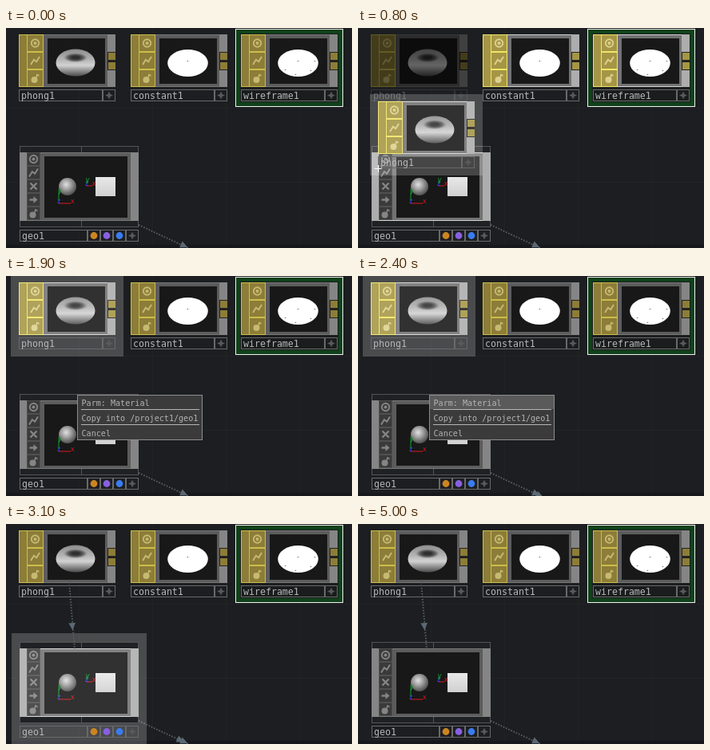
These frames come from a looping animation (433 px wide and 276 px high, 5.2 s). An HTML page:

```html
<!DOCTYPE html>
<html lang="en">
<head>
<meta charset="utf-8">
<title>Node network</title>
<style>
  html, body { margin: 0; width: 100%; height: 100%; overflow: hidden; background: #1c1e21; }
  svg {
    display: block; width: 433px; height: 276px;
    --yellow: #8c7d38; --edge: #cdbd4c; --icon: #c6b970;
    --frame: #5c5c5c; --rim: #777; --strip: #858585;
  }
  .bright {
    --yellow: #a59646; --edge: #f0e566; --icon: #ddd08c;
    --frame: #727272; --rim: #d4d4d4; --strip: #adadad;
  }
  text { font: 11.6px "DejaVu Sans Mono", monospace; fill: #b8b8b8; }
  #menu text { font-size: 10.1px; fill: #b4b4b4; }
  .axis text { font: 9px "Liberation Sans", Arial, sans-serif; }
  .wire { stroke: #56616a; stroke-width: 2; stroke-dasharray: 1.5 2; fill: none; }
</style>
</head>
<body>
<svg id="stage" viewBox="0 0 433 276" xmlns="http://www.w3.org/2000/svg"></svg>
<script>
const LOOP = 5200;
const YELLOW = 'var(--yellow)', EDGE = 'var(--edge)', ICON = 'var(--icon)';
const FRAME = 'var(--frame)', RIM = 'var(--rim)', STRIP = 'var(--strip)';

const rect = (x, y, w, h, fill, stroke) => stroke
  ? `<rect x="${x + .5}" y="${y + .5}" width="${w - 1}" height="${h - 1}" style="fill:${fill};stroke:${stroke}"/>`
  : `<rect x="${x}" y="${y}" width="${w}" height="${h}" style="fill:${fill}"/>`;
const line = (x1, y1, x2, y2, color) => `<path d="M${x1} ${y1}L${x2} ${y2}" stroke="${color}" fill="none"/>`;
const label = (x, y, text, color) => `<text x="${x}" y="${y}" ${color ? `style="fill:${color}"` : ''}>${text}</text>`;
const ellipse = (x, y, rx, ry, fill) => `<ellipse cx="${x}" cy="${y}" rx="${rx}" ry="${ry}" fill="${fill}"/>`;
const group = (x, y, body, extra = '') => `<g transform="translate(${x} ${y})" ${extra}>${body}</g>`;

// Icons are centred on 0,0.
const icons = {
  ring: c => `<circle r="4.7" style="fill:none;stroke:${c};stroke-width:1.9"/><circle r="2" style="fill:${c}"/>`,
  bolt: c => `<path d="M5.5-5L1.6 1.2L-1.6-1.2L-5.5 5" style="fill:none;stroke:${c};stroke-width:2"/>`,
  lock: c => `<circle cx="-1" cy="2" r="4" style="fill:${c}"/>
    <path d="M1.5-1L2.5-4.5L5-3" style="fill:none;stroke:${c};stroke-width:1.6"/>`,
  cross: c => `<path d="M-4-4L4 4M4-4L-4 4" style="stroke:${c};stroke-width:2.4"/>`,
  arrow: c => `<path d="M-5-1.3H0V-4.5L5 0L0 4.5V1.3H-5Z" style="fill:${c}"/>`,
  plus: c => `<path d="M0-5L1.5-1.5L5 0L1.5 1.5L0 5L-1.5 1.5L-5 0L-1.5-1.5Z" style="fill:${c}"/>`
};

const torus = ellipse(71, 35.5, 24.5, 17, 'url(#metal)') + ellipse(71, 29, 16, 6.5, 'url(#hole)');
const blob = ellipse(71.5, 36, 25.3, 17, '#fff') + rect(71, 33, 1, 1, '#444');
const mesh = blob + [[55, 44], [68, 50], [87, 45], [92, 33]].map(([x, y]) => rect(x, y, 1, 1, '#444')).join('');

const plusBox = (x, y) => rect(x, y, 16, 15, 'none', '#696969') + group(x + 8, y + 7.5, icons.plus('#5a5a5a'));

// Material node, 121 by 84, placed at its top left corner.
function materialNode(name, shape) {
  const buttons = ['ring', 'bolt', 'lock'].map((icon, i) =>
    rect(10, i * 22, 21, 22, YELLOW, EDGE) + group(20.5, i * 22 + 11, icons[icon](ICON))).join('');
  return rect(0, 0, 121, 66, FRAME, RIM) +
    rect(0, 0, 11, 66, YELLOW, EDGE) + buttons +
    rect(36, 5, 72, 57, '#181818') + shape +
    rect(111, 0, 10, 66, STRIP) +
    rect(111, 22, 10, 23, '#222') +
    rect(112, 23, 9, 9, YELLOW) + rect(112, 35, 9, 9, YELLOW) +
    rect(0, 69, 105, 15, 'none', '#696969') + plusBox(105, 69) +
    label(3, 80.5, name);
}

// A node under the pointer: a pale plate behind it and a light film on it.
const litNode = (x, y, name, shape) =>
  rect(x - 10, y - 9, 141, 102, 'rgba(255,255,255,.2)') +
  group(x, y, materialNode(name, shape) + rect(0, 0, 121, 66, 'rgba(255,255,255,.11)'), 'class="bright"');

const axes = (x, y, size) => `<g class="axis">` +
  line(x, y, x + size, y, '#e01414') +
  line(x, y - 3, x, y - size, '#12a02a') +
  label(x - 2, y, 'z', '#3346ff') +
  label(x + size, y, 'x', '#e01414') +
  label(x - 1, y - size + 2, 'y', '#12a02a') + '</g>';

function geoNode() {
  const tabs = y => rect(17, y, 78, 9, '#202124', '#545454') + rect(94, y, 72, 9, '#202124', '#545454');
  const buttons = ['ring', 'bolt', 'cross', 'arrow', 'lock'].map((icon, i) =>
    rect(26, 156 + i * 17, 17, 17, '#3a3a3a', '#505050') +
    group(34.5, 164.5 + i * 17, icons[icon]('#858585'))).join('');
  const dots = ['#cc8420', '#8660e0', '#3a7cf0'].map((color, i) =>
    rect(102 + i * 16, 253, 16, 15, 'none', '#696969') +
    ellipse(110 + i * 16, 260.5, 4.4, 4.4, color)).join('');
  return tabs(148) + tabs(241) +
    rect(17, 156, 149, 86, FRAME, RIM) +
    rect(17, 156, 9, 86, STRIP) + buttons +
    rect(48, 161, 104, 77, '#181818') +
    ellipse(77, 199, 11, 11, 'url(#ball)') +
    axes(66, 220, 15) + axes(101, 198, 7) +
    rect(112, 187, 25, 24, 'url(#cube)') +
    rect(156, 156, 10, 86, STRIP) +
    rect(17, 253, 85, 15, 'none', '#696969') + label(20, 264.5, 'geo1') + dots +
    plusBox(150, 253);
}

const gridLines =
  [100, 193].map(y => line(0, y + .5, 433, y + .5, '#212327')).join('') +
  [91, 183, 275, 367].map(x => line(x + .5, 0, x + .5, 272, '#202226')).join('');

const head = (id, x, y, angle) =>
  `<path id="${id}" d="M5.5 0L-4-4.3V4.3Z" fill="#5b6973" transform="translate(${x} ${y}) rotate(${angle})"/>`;

const menu = rect(89, 149, 157, 57, '#3b3b3b', '#8d8d8d') +
  `<rect id="hover" x="90" y="150" width="155" height="17" fill="#5a5a5a"/>` +
  line(94, 167.5, 242, 167.5, '#b5b5b5') + line(94, 186.5, 242, 186.5, '#b5b5b5') +
  ['Parm: Material', 'Copy into /project1/geo1', 'Cancel']
    .map((text, i) => label(94.5, 163 + i * 19, text)).join('');

document.getElementById('stage').innerHTML = `
  <defs>
    <linearGradient id="metal" x2="0" y2="1">
      <stop stop-color="#8c8c8c"/><stop offset=".35" stop-color="#b0b0b0"/>
      <stop offset=".6" stop-color="#d2d2d2"/><stop offset="1" stop-color="#4a4a4a"/>
    </linearGradient>
    <radialGradient id="hole">
      <stop offset=".3" stop-color="#303030"/><stop offset=".65" stop-color="#686868"/>
      <stop offset="1" stop-color="#a0a0a0" stop-opacity="0"/>
    </radialGradient>
    <radialGradient id="ball" cx=".42" cy=".38" r=".62">
      <stop stop-color="#e0e0e0"/><stop offset=".35" stop-color="#b0b0b0"/><stop offset="1" stop-color="#505050"/>
    </radialGradient>
    <linearGradient id="cube" x2="0" y2="1"><stop stop-color="#e8e8e8"/><stop offset="1" stop-color="#d0d0d0"/></linearGradient>
  </defs>
  ${rect(0, 0, 433, 276, '#1c1e21')}${gridLines}${rect(0, 272, 433, 4, '#17181b')}
  <path class="wire" d="M166 247L228 276"/>
  ${head('middle', 222.5, 273, 25)}${head('pulse', 0, 0, 25)}
  <g id="phong">${group(16, 8, materialNode('phong1', torus))}</g>
  <g id="phongLit">${litNode(16, 8, 'phong1', torus)}</g>
  <g id="others">
    ${group(156, 8, materialNode('constant1', blob))}
    ${rect(287, 1, 135, 98, '#10421b', '#f2f2f2')}${rect(293, 7, 123, 86, '#1a1d1e')}
    ${group(294, 8, materialNode('wireframe1', mesh))}
  </g>
  <g id="geoGlow">${rect(7, 137, 169, 139, 'rgba(255,255,255,.2)')}</g>
  <g id="geo">${geoNode()}</g>
  <g id="geoFilm">${rect(17, 156, 149, 86, 'rgba(255,255,255,.11)')}</g>
  <g id="link"><path class="wire" d="M79 73L86 157"/>${head('linkHead', 83, 128, 85)}</g>
  <g id="ghost">
    ${litNode(16, 8, 'phong1', torus)}
    <path id="cursor" d="M11.5 92.5H20.5M16.5 88V97" stroke="#fff"/>
  </g>
  <g id="menu">${menu}</g>`;

const part = id => document.getElementById(id);
const show = (id, on) => part(id).setAttribute('visibility', on ? 'inherit' : 'hidden');

// Drag offset: time, x, y
const drag = [[600, -4, 6], [700, 2, 19], [800, 9, 84], [900, 13, 110], [1000, 16, 128], [1100, 18, 139]];
// Wire pulses: start time, first x, number of 100 ms steps
const pulses = [[200, 200, 4], [600, 203, 2], [900, 202, 4], [1400, 200, 4], [2100, 200, 4], [2500, 203, 2],
  [2900, 200, 4], [3500, 202, 4], [3900, 206, 3], [4400, 200, 4], [4800, 203, 2]];

function draw(time) {
  const t = Math.floor(time % LOOP / 100) * 100;
  const within = (from, to) => t >= from && t < to;
  const dragging = within(600, 1400);
  const phongLit = within(200, 600) || within(1400, 2600);
  const geoLit = within(2900, 3300);

  part('phong').style.filter = dragging ? 'brightness(.48)' : '';
  part('others').classList.toggle('bright', dragging);
  part('geo').classList.toggle('bright', dragging || geoLit);
  show('phong', !phongLit);
  show('phongLit', phongLit);
  show('geoGlow', geoLit);
  show('geoFilm', geoLit);

  show('ghost', dragging);
  if (dragging) {
    const [, x, y] = drag.findLast(step => step[0] <= t);
    const ghost = part('ghost');
    ghost.setAttribute('transform', `translate(${x} ${y})`);
    ghost.style.filter = t < 1200 ? '' : 'brightness(.68)';
    show('cursor', t < 1000);
  }

  show('menu', within(1400, 2600));
  show('hover', within(2000, 2600));
  show('link', t >= 2700);

  const pulse = pulses.find(([start, , steps]) => within(start, start + steps * 100));
  show('pulse', pulse);
  if (pulse) {
    const x = pulse[1] + (t - pulse[0]) * .09;
    part('pulse').setAttribute('transform', `translate(${x} ${247 + (x - 166) * .465}) rotate(25)`);
  }
}

const began = performance.now();
function tick() {
  draw(performance.now() - began);
  requestAnimationFrame(tick);
}
tick();
</script>
</body>
</html>
```
